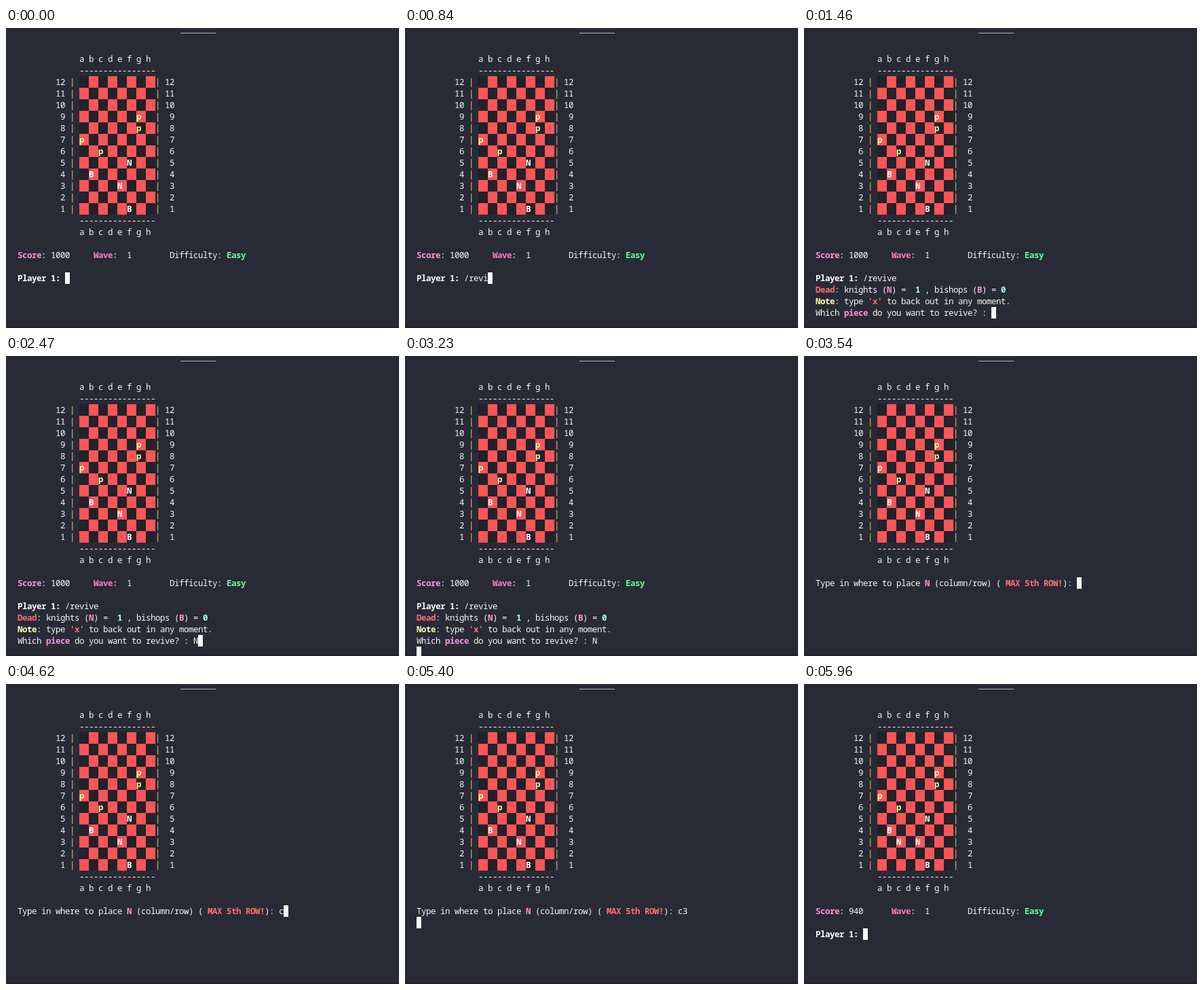
Recreate the animation shown at these times as an HTML page with a canvas. Size 579x442 px, loop 7.34 s.

```html
<!DOCTYPE html>
<html lang="en">
<head>
<meta charset="utf-8">
<title>Terminal chess</title>
<style>
html, body { margin: 0; width: 100%; height: 100%; overflow: hidden; background: #282a36; }
canvas { display: block; }
</style>
</head>
<body>
<canvas id="stage" width="579" height="442"></canvas>
<script>
const ctx = document.getElementById('stage').getContext('2d', { alpha: false });
const LOOP = 7340, CELL_W = 7, CELL_H = 17, LEFT = 17, TOP = 20;
const FONT = '12.5px "Noto Sans Mono", "DejaVu Sans Mono", monospace';
const WHITE = '#f8f8f2', PINK = '#ff92df', ROSE = '#ff79c6', RED = '#ff6e6e',
  GREEN = '#69ff94', YELLOW = '#ffffa5', CYAN = '#a4ffff', BAR = '#f1d070';
const PIECES = ['g9p', 'g8p', 'a7p', 'c6p', 'f5N', 'b4B', 'e3N', 'f1B'];
const COLUMNS = 'abcdefgh';

function rect(color, x, y, w, h) {
  ctx.fillStyle = color;
  ctx.fillRect(x, y, w, h);
}

const cellRect = (color, col, row, cols = 1) =>
  rect(color, LEFT + col * CELL_W, TOP + row * CELL_H, cols * CELL_W, CELL_H);

function put(col, row, text, color = WHITE, bold = false) {
  ctx.font = (bold ? 'bold ' : '') + FONT;
  ctx.fillStyle = color;
  [...text].forEach((ch, i) =>
    ctx.fillText(ch, LEFT + (col + i) * CELL_W, TOP + row * CELL_H + 13));
}

// Parts are plain strings or [bold text, color]; returns the end column.
function line(row, ...parts) {
  let col = 0;
  for (const part of parts) {
    const [text, color] = [].concat(part);
    put(col, row, text, color, Boolean(color));
    col += text.length;
  }
  return col;
}

const cursor = (col, row) => cellRect(WHITE, col, row);

function board(pieces) {
  for (const row of [1, 16]) put(13, row, [...COLUMNS].join(' '));
  for (const row of [2, 15]) put(13, row, '-'.repeat(16));
  for (let rank = 12; rank > 0; rank--) {
    const row = 15 - rank, label = String(rank).padStart(2);
    for (let i = 0; i < 8; i++)
      cellRect((rank + i) % 2 ? '#ff5555' : '#21222c', 13 + 2 * i, row, 2);
    put(8, row, label);
    put(11, row, '|', BAR);
    put(29, row, '|', BAR);
    put(31, row, label);
  }
  for (const [file, rank, kind] of pieces)
    put(13 + 2 * COLUMNS.indexOf(file), 15 - rank, kind, kind === 'p' ? YELLOW : '#ffffff', true);
}

function status(score, command) {
  line(18, ['Score', PINK], (': ' + score).padEnd(11), ['Wave:', ROSE],
    '  1        Difficulty: ', ['Easy', GREEN]);
  return line(20, ['Player 1:', '#ffffff'], ' ' + command);
}

// The part of the text whose key times have passed.
const typed = (text, times, t) => text.slice(0, times.filter(k => k <= t).length);

function commandScreen(t) {
  board(PIECES);
  const end = status(1000, typed('/revive', [150, 380, 610, 760, 840, 990, 1160], t));
  if (t < 1460) return cursor(end, 20);
  line(21, ['Dead', RED], ': knights (', ['N', PINK], ') =  ', ['1', CYAN],
    ' , bishops (', ['B', PINK], ') = ', ['0', CYAN]);
  line(22, ['Note', YELLOW], ': type ', ["'x'", RED], ' to back out in any moment.');
  const col = line(23, 'Which ', ['piece', PINK], ' do you want to revive? : ', typed('N', [2470], t));
  t < 3230 ? cursor(col, 23) : cursor(0, 24);
}

function placeScreen(t) {
  board(PIECES);
  const col = line(18, 'Type in where to place ', ['N', PINK], ' (column/row) ( ',
    ['MAX 5th ROW!', RED], '): ', typed('c3', [4620, 5020], t));
  t < 5400 ? cursor(col, 18) : cursor(0, 19);
}

function draw(now) {
  const t = now % LOOP;
  rect('#282a36', 0, 0, 579, 442);
  rect('#23222e', 0, 440, 579, 2);
  rect('#b4b5b9', 257, 7, 52, 1);
  if (t < 3460) commandScreen(t);
  else if (t < 3540) cursor(0, 0);
  else if (t < 5960) placeScreen(t);
  else {
    board([...PIECES, 'c3N']);
    cursor(status(940, ''), 20);
  }
}

const start = performance.now();
function tick() {
  draw(performance.now() - start);
  requestAnimationFrame(tick);
}
tick();
</script>
</body>
</html>
```
